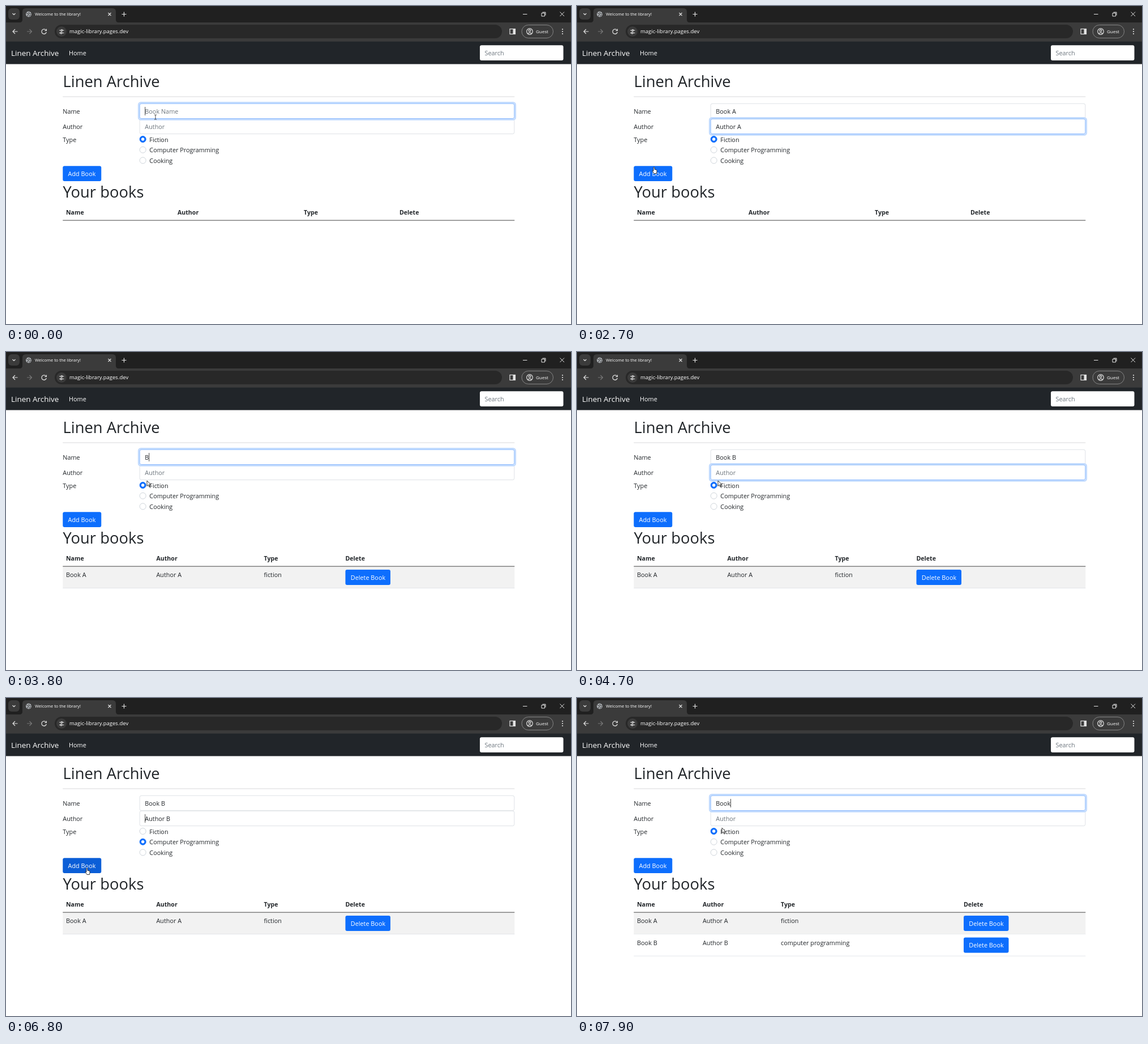
Animation of 998x561 px, one loop 8000 ms. Source, as an HTML page:

```html
<!DOCTYPE html>
<html lang="en">
<head>
<meta charset="utf-8">
<title>Welcome to the library!</title>
<style>
html, body { margin: 0; width: 100%; height: 100%; overflow: hidden; background: #fff; }
svg { display: block; width: 998px; height: 561px; }
text { font: 10.85px "Open Sans", "Noto Sans", sans-serif; white-space: pre; fill: #212529; }
.h1 { font-size: 27.4px; font-weight: 500; }
.b { font-size: 10.6px; font-weight: 700; }
.w { fill: #fff; }
.ph { fill: #6c757d; }
.brand { font-size: 13.5px; }
.tab { font-size: 7.5px; }
.url { font-size: 9.5px; }
.guest { font-size: 8px; }
.line { fill: none; stroke: #e3e3e3; stroke-width: 1.2; }
.cursor { fill: #fff; stroke: #222; stroke-width: .9; stroke-linejoin: round; }
</style>
</head>
<body>
<svg viewBox="0 0 998 561">
  <rect width="998" height="63" fill="#202020"/>
  <rect x="4" y="4" width="20" height="20" rx="6" fill="#3b3b3b"/>
  <path d="M0 29H24q5 0 5-5V10q0-6 6-6H188q6 0 6 6V24q0 5 5 5H998V63H0Z" fill="#3b3b3b"/>
  <rect x="86" y="33" width="790" height="24" rx="12" fill="#282828"/>
  <circle cx="98" cy="45" r="9" fill="#3b3b3b"/>
  <rect x="911" y="33.5" width="55.5" height="23" rx="11.5" fill="none" stroke="#858585"/>
  <circle cx="40" cy="14.5" r="5" fill="#a9adb1"/>
  <path d="M36 12.5l3 1 1 2-2 1v2M41 10.5l-1 2 3 1.5 1.5-1M41 18.5l1-2 2-.5" fill="none" stroke="#3b3b3b"/>
  <g class="line">
    <path d="M11.5 13l2.5 2.5 2.5-2.5M180.5 12l5 5m0-5l-5 5M204.5 14.5h8m-4-4v8"/>
    <path d="M20.5 45h-8.5m4-4l-4 4 4 4"/>
    <path d="M37 45h8.5m-4-4l4 4-4 4" stroke="#777"/>
    <path d="M70.5 42.5a4.2 4.2 0 1 0 .8 3.5M71.4 40.5v3h-3"/>
    <path d="M94 43h3m3 0h2.5M94 47.5h2m3 0h3.5"/>
    <circle cx="98.5" cy="43" r="1.4"/><circle cx="97.5" cy="47.5" r="1.4"/>
    <rect x="890" y="40.5" width="9.5" height="9"/>
    <path d="M897.5 40.5v9" stroke-width="4"/>
    <circle cx="925" cy="45" r="5.3"/><circle cx="925" cy="43.4" r="1.8"/>
    <path d="M921.5 48.7q3.5-3 7 0"/>
    <path d="M913 14.5h7.5M978.5 10.5l7.5 7.5m0-7.5l-7.5 7.5" stroke-width="1"/>
    <path d="M946 12.5h5.5v5.5h-5.5ZM947.5 11h5.5v5.5" stroke-width="1"/>
  </g>
  <g fill="#e3e3e3"><circle cx="983" cy="41" r="1.1"/><circle cx="983" cy="45" r="1.1"/><circle cx="983" cy="49" r="1.1"/></g>
  <text class="w tab" x="51" y="17.3">Welcome to the library!</text>
  <text class="w url" x="112" y="48.2">magic-library.pages.dev</text>
  <text class="w guest" x="936" y="47.8">Guest</text>
  <rect y="62.7" width="998" height="39.8" fill="#212529"/>
  <text class="w brand" x="9" y="88.3">Linen Archive</text>
  <text class="w" x="111" y="87">Home</text>
  <rect x="837" y="69.3" width="147.5" height="26.8" rx="3" fill="#fff"/>
  <text class="ph" x="845.5" y="87">Search</text>
  <g id="page"></g>
</svg>
<script>
const LOOP = 8000, ALERT_HEIGHT = 44.7;
const page = document.getElementById('page');

const empty = { name: '', author: '', focus: '', caret: 0, type: 0, hover: 0 };
const start = { ...empty, focus: 'name', caret: 1, rows: 0, alert: 0, mouse: [264, 196, 'beam'] };
const move = (...mouse) => ({ mouse });

// Each entry changes part of the state from its time on.
const timeline = [
  [200, { name: 'B' }], [300, { name: 'Boo' }], [400, { name: 'Book' }],
  [600, { name: 'Book ' }], [700, { name: 'Book A' }],
  [1000, { focus: 'author' }], [1200, { author: 'A' }],
  [1400, { author: 'Auth' }], [1500, { author: 'Autho' }], [1600, { author: 'Author ' }],
  [1800, { caret: 0 }], [1900, { caret: 1 }],
  [2200, { author: 'Author A' }], [2300, move(252, 206, 'beam')], [2400, move(214, 212, 'arrow')],
  [2600, { caret: 0, ...move(152, 268, 'arrow') }], [2700, move(137, 290, 'hand')],
  [2800, { ...empty, rows: 1, alert: 1, ...move(137, 290, 'arrow') }],
  [3000, move(150, 285, 'arrow')], [3100, move(196, 262, 'arrow')], [3200, move(246, 237, 'beam')],
  [3400, { focus: 'name', ...move(254, 232, 'beam') }],
  [3500, { alert: 0, caret: 1, ...move(249, 227, 'arrow') }],
  [3800, { name: 'B' }], [3900, { name: 'Boo' }], [4000, { name: 'Book' }],
  [4200, { name: 'Book ' }], [4300, { name: 'Book B' }],
  [4600, { focus: 'author', caret: 0 }], [4800, { author: 'Au', caret: 1 }],
  [5000, { author: 'Auth' }], [5100, { author: 'Autho' }], [5200, { author: 'Author' }],
  [5400, { author: 'Author ' }], [5500, { author: 'Author B' }],
  [5800, move(252, 236, 'arrow')], [5900, move(260, 250, 'arrow')],
  [6000, { type: 1, focus: 'radio', ...move(264, 254, 'arrow') }],
  [6600, move(232, 264, 'arrow')], [6700, move(168, 292, 'hand')],
  [6800, { focus: '', hover: 1, ...move(144, 306, 'hand') }],
  [7000, { ...empty, rows: 2, alert: 1, ...move(144, 300, 'arrow') }],
  [7100, move(162, 288, 'arrow')], [7200, move(220, 248, 'arrow')],
  [7400, { focus: 'name', caret: 1, ...move(256, 229, 'beam') }],
  [7500, { alert: 0, ...move(256, 229, 'arrow') }],
  [7600, { name: 'B' }], [7800, { name: 'Boo' }], [7900, { name: 'Book' }]
];

const columns = [[106, 303, 526, 695], [106, 265.5, 455.5, 599.5], [106, 222, 360, 683]];
const books = [['Book A', 'Author A', 'fiction'], ['Book B', 'Author B', 'computer programming']];
const cursors = {
  beam: '<path d="M-2-4.2q2 0 2 1 0-1 2-1M0-3.5v7M-2 4.2q2 0 2-1 0 1 2 1" fill="none" stroke="#333" stroke-width=".9"/>',
  arrow: '<path class="cursor" d="M0 0V9.5L2.3 7.4 3.9 11 5.3 10.4 3.8 6.9H6.8Z"/>',
  hand: '<path class="cursor" d="M-2-5a1 1 0 0 1 2 0v3.2l3 .8q1.5.4 1.2 2L3.5 5.5H-1L-3.8 1.2q-.3-1.3.8-.9l1 1Z"/>'
};

const text = (x, y, s, cls = '') => `<text x="${x}" y="${y}" class="${cls}">${s}</text>`;
const rect = (x, y, w, h, fill, extra = '') =>
  `<rect x="${x}" y="${y}" width="${w}" height="${h}" fill="${fill}" ${extra}/>`;
const button = (x, y, w, s, fill = '#0d6efd') =>
  rect(x, y, w, 26.8, fill, 'rx="3"') + text(x + 9.3, y + 17.7, s, 'w');

function field(s, key, y, hint) {
  const on = s.focus === key, value = s[key];
  const glow = on ? rect(234.3, y - 1.6, 665.4, 30, 'none', 'rx="4" stroke="#c2dbfe" stroke-width="2.8"') : '';
  return glow + rect(236.2, y + .2, 661.6, 26.4, '#fff', `rx="3" stroke="${on ? '#86b7fe' : '#dee2e6'}"`)
    + text(245.3, y + 18.2, value || hint, value ? 'value-' + key : 'ph');
}

function radio(s, i, label) {
  const y = 235 + i * 18.7, on = s.type === i;
  const glow = on && s.focus === 'radio' ? `<circle cx="241.7" cy="${y}" r="8.5" fill="#c2dbfe"/>` : '';
  return glow + `<circle cx="241.7" cy="${y}" r="5.5" fill="${on ? '#0d6efd' : '#fff'}" stroke="${on ? '#0d6efd' : '#ced4da'}"/>`
    + (on ? `<circle cx="241.7" cy="${y}" r="2.7" fill="#fff"/>` : '') + text(253.3, y + 4.7, label);
}

function table(rows) {
  const xs = columns[rows];
  let out = ['Name', 'Author', 'Type', 'Delete'].map((s, i) => text(xs[i], 368, s, 'b')).join('');
  for (let i = 0; i < rows; i++) {
    const y = 378.2 + i * 38.5;
    out += rect(100.3, y, 798, 38.3, i ? '#fff' : '#f2f2f2') + rect(100.3, y + 38, 798, .8, '#dee2e6')
      + books[i].map((s, j) => text(xs[j], y + 19, s)).join('') + button(xs[3], y + 5.9, 79.5, 'Delete Book');
  }
  return out + rect(100.3, 377.6, 798, 1, '#444');
}

const alertBar = () => rect(0, 102.5, 998, 45, '#d1e7dd')
  + `<text x="12" y="129"><tspan class="b">Message:</tspan> Your book has been successfully added!</text>`
  + rect(268.8, 115.3, 17, 19.2, '#efefef', 'stroke="#111" stroke-width="1.4"') + text(274.2, 129, '×');

function form(s) {
  const fields = [field(s, 'name', 172, 'Book Name'), field(s, 'author', 199, 'Author')];
  if (s.focus === 'name') fields.reverse();
  return text(100.5, 143, 'Linen Archive', 'h1') + rect(100.3, 159.6, 798, .8, '#cfd0d1')
    + text(100.3, 190.2, 'Name') + text(100.3, 217.2, 'Author') + text(100.3, 239.7, 'Type')
    + fields.join('') + ['Fiction', 'Computer Programming', 'Cooking'].map((l, i) => radio(s, i, l)).join('')
    + button(100.3, 282.2, 68, 'Add Book', s.hover ? '#0b5ed7' : undefined)
    + text(100.5, 338, 'Your books', 'h1') + table(s.rows);
}

function draw(s) {
  const [x, y, kind] = s.mouse;
  page.innerHTML = (s.alert ? alertBar() : '')
    + `<g transform="translate(0 ${s.alert * ALERT_HEIGHT})">${form(s)}${rect(0, 0, .9, 15, '#333', 'id="caret"')}</g>`
    + `<g transform="translate(${x} ${y})">${cursors[kind]}</g>`;
  const caret = document.getElementById('caret');
  if (!s.caret) return caret.remove();
  const typed = page.querySelector('.value-' + s.focus);
  caret.setAttribute('x', 245.3 + (typed ? typed.getComputedTextLength() : 0));
  caret.setAttribute('y', s.focus === 'name' ? 178 : 205);
}

let shown = -1;
function tick() {
  const t = performance.now() % LOOP;
  const passed = timeline.filter(([at]) => at <= t);
  if (passed.length !== shown) {
    shown = passed.length;
    draw(Object.assign({}, start, ...passed.map(([, change]) => change)));
  }
  requestAnimationFrame(tick);
}
tick();
</script>
</body>
</html>
```
